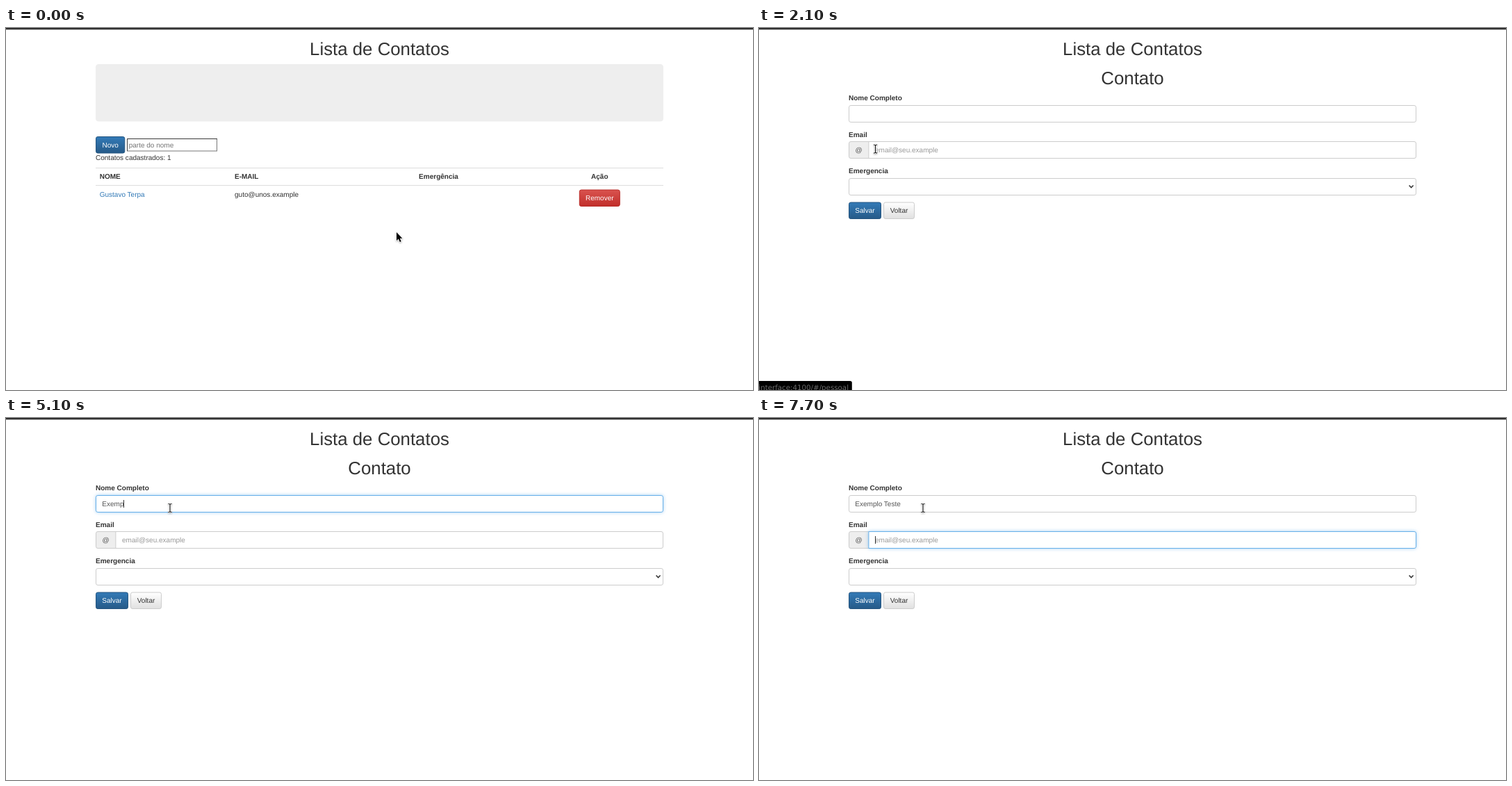
Recreate the animation shown at these times as an HTML page. Size 1075 by 521 pixels, loop 8000 ms.

```html
<!DOCTYPE html>
<html lang="pt-BR">
<head>
<meta charset="utf-8">
<title>Lista de Contatos</title>
<style>
  html, body { margin: 0; width: 100%; height: 100%; overflow: hidden; background: #fff; }
  svg { display: block; width: 100vw; height: 100vh; }
  text {
    font: 10.03px "Liberation Sans", Arial, sans-serif;
    fill: #333; white-space: pre; text-rendering: geometricPrecision;
  }
  .h { font-size: 25.8px; text-anchor: middle; }
  .b { font-weight: bold; }
  .m { text-anchor: middle; }
  .w { fill: #fff; }
  .link { fill: #337ab7; }
  .val { fill: #555; }
  .hint { fill: #999; }
  .url { font: 10.25px "DejaVu Sans", sans-serif; fill: #6b6b6b; text-anchor: end; }
</style>
</head>
<body>
<svg id="stage" viewBox="0 0 1075 521" preserveAspectRatio="none">
  <defs>
    <linearGradient id="blue" x2="0" y2="1"><stop stop-color="#337ab7"/><stop offset="1" stop-color="#265a88"/></linearGradient>
    <linearGradient id="red" x2="0" y2="1"><stop stop-color="#d9534f"/><stop offset="1" stop-color="#c12e2a"/></linearGradient>
    <linearGradient id="pale" x2="0" y2="1"><stop stop-color="#fff"/><stop offset="1" stop-color="#e0e0e0"/></linearGradient>
  </defs>
</svg>
<script>
const LOOP = 8000;
const stage = document.getElementById('stage');
const $ = id => document.getElementById(id);

const text = (x, y, s, cls = '', id = '') =>
  `<text x="${x}" y="${y}" class="${cls}" id="${id}">${s}</text>`;
const rect = (x, y, w, h, fill, stroke = 'none', r = 0, id = '') =>
  `<rect x="${x}" y="${y}" width="${w}" height="${h}" rx="${r}" fill="${fill}" stroke="${stroke}" id="${id}"/>`;
const button = (x, y, w, label, fill, edge, cls = 'w', id = '') =>
  rect(x + .5, y + .5, w - 1, 23.5, fill, edge, 2.6, id) +
  text(x + w / 2, y + 15.7, label, cls + ' m');
const field = (x, y, w, id = '') => rect(x, y, w, 24, '#fff', '#cccccc', 2.6, id);
const shape = (id, d, look) => `<g id="${id}"><path d="${d}" ${look[0]}/><path d="${d}" ${look[1]}/></g>`;

const list =
  rect(129, 52, 817, 82.5, '#eee', 'none', 4.3) +
  button(129, 156, 42.3, 'Novo', 'url(#blue)', '#245580', 'w', 'novo') +
  rect(174.5, 159.5, 129, 17.5, '#fff', '#767676') +
  '<path d="M174.5 177V159.5H304" fill="none" stroke="#3a3a3a"/>' +
  text(176.7, 171.6, 'parte do nome', '', 'filter') +
  text(129, 189.7, 'Contatos cadastrados: 1') +
  rect(129, 201, 817, 1, '#ddd') +
  rect(129, 226, 817, 1, '#ddd') +
  text(134.7, 217.1, 'NOME', 'b') +
  text(329, 217.1, 'E-MAIL', 'b') +
  text(622.5, 217.1, 'Emergência', 'b m') +
  text(854.3, 217.1, 'Ação', 'b m') +
  text(134.7, 242.7, 'Gustavo Terpa', 'link') +
  text(329, 242.7, 'guto@unos.example') +
  button(824.8, 232.5, 59, 'Remover', 'url(#red)', '#b92c28');

const form =
  text(537.5, 81.4, 'Contato', 'h') +
  text(129, 103.9, 'Nome Completo', 'b') +
  field(129.5, 111.5, 816, 'name') +
  text(138.3, 127.1, '', 'val', 'typed') +
  text(129, 156.6, 'Email', 'b') +
  rect(129.5, 163.5, 32, 24, '#eee', '#ccc', 2.6) +
  text(143.6, 178.6, '@', 'val m') +
  '<path id="mail" d="M157.9 163.5H943Q945.5 163.5 945.5 166V185Q945.5 187.5 943 187.5H157.9Z" fill="#fff" stroke="#cccccc"/>' +
  text(167, 178.9, 'email@seu.example', 'hint') +
  text(129, 209, 'Emergencia', 'b') +
  field(129.5, 216.5, 816) +
  '<path d="M935.6 226.4L938.6 229.6L941.6 226.4" fill="none" stroke="#333" stroke-width="1.5"/>' +
  button(129, 250.5, 47, 'Salvar', 'url(#blue)', '#245580') +
  button(179, 250.5, 45, 'Voltar', 'url(#pale)', '#ccc', '') +
  rect(138, 118, 1, 11, '#333', 'none', 0, 'caret');

const solid = ['fill="#fff" stroke="#fff" stroke-width="1.6" stroke-linejoin="round"', 'fill="#000"'];
const line = ['fill="none" stroke="#fff" stroke-width="2.6"', 'fill="none" stroke="#111" stroke-width="1.1"'];
const pointers =
  shape('arrow', 'M0 0V12L2.8 9.5L4.8 14L6.7 13.2L4.8 8.8H8.4Z', solid) +
  shape('hand', 'M-1.3 1Q0 -.6 1.3 1V4.6L5 5.6Q6 6 5.8 7.6L5 12.4H-2.4L-6 8.2Q-6.4 6.8 -5 6.8L-1.3 8Z', solid) +
  shape('beam', 'M-2.6 -6Q0 -6 0 -4.8Q0 -6 2.6 -6M0 -5V5M-2.6 6Q0 6 0 4.8Q0 6 2.6 6', line);

stage.insertAdjacentHTML('beforeend',
  rect(0, 0, 1075, 2.3, '#303030') +
  text(537.5, 39, 'Lista de Contatos', 'h') +
  `<g id="list">${list}</g><g id="form">${form}</g>` +
  `<g id="status">${rect(-4, 508, 137.8, 20, '#000', 'none', 2.6)}${text(129, 520.6, 'interface:4100/#/pessoal', 'url')}</g>` +
  `<g id="pointer" style="filter:drop-shadow(.7px 1px .8px rgba(0,0,0,.3))">${pointers}</g>`);
$('filter').style.fill = '#757575';

// Each row: start time, then the values held until the next row
const moves = [
  [0, 'arrow', 562, 294], [500, 'arrow', 556, 301], [600, 'arrow', 527, 310],
  [700, 'arrow', 468, 308], [800, 'arrow', 388, 298], [900, 'arrow', 300, 284],
  [1000, 'arrow', 224, 268], [1100, 'arrow', 172, 254], [1200, 'arrow', 154, 226],
  [1300, 'arrow', 184, 201], [1700, 'arrow', 174, 185], [1800, 'hand', 162.5, 174.5],
  [2100, 'beam', 167.5, 174], [2200, 'beam', 196, 168], [2300, 'beam', 222, 130],
  [2500, 'beam', 227.5, 123.5], [2800, 'beam', 236, 129.5]
];
const press = [[0, 'url(#blue)', '#245580'], [1800, '#265a88', '#204d74'], [1900, '#1f4c73', '#122b40']];
const status = [[0, 0], [1900, .8], [2100, 1], [2500, .5], [2600, 0]];
const nameGlow = [[0, 0], [2500, .5], [2600, 1], [7500, .3], [7700, 0]];
const mailGlow = [[0, 0], [7500, .6], [7700, 1]];
const caret = [[0, 0], [2600, 1], [3100, 0], [3600, 1]];
const typing = [
  [0, 0], [4200, 1], [4400, 2], [4600, 3], [4800, 4], [5100, 5], [5200, 6],
  [5400, 7], [5700, 8], [6200, 9], [6500, 10], [6600, 11], [6900, 13]
];

const at = (rows, t) => rows.filter(r => r[0] <= t).pop().slice(1);
const show = (id, on) => $(id).setAttribute('visibility', on ? 'inherit' : 'hidden');

function glow(id, k) {
  const mix = (a, b) => Math.round(a + (b - a) * k);
  const el = $(id);
  el.setAttribute('stroke', `rgb(${mix(204, 102)},${mix(204, 175)},${mix(204, 233)})`);
  el.style.filter = k ? `drop-shadow(0 0 2.4px rgba(102,175,233,${.6 * k}))` : 'none';
}

function draw(t) {
  const inForm = t >= 2100;
  $('list').style.display = inForm ? 'none' : '';
  $('form').style.display = inForm ? '' : 'none';

  const [kind, x, y] = at(moves, t);
  ['arrow', 'hand', 'beam'].forEach(k => show(k, k === kind));
  $('pointer').setAttribute('transform', `translate(${x} ${y})`);

  const [fill, edge] = at(press, t);
  $('novo').setAttribute('fill', fill);
  $('novo').setAttribute('stroke', edge);
  $('status').style.opacity = at(status, t)[0];

  glow('name', at(nameGlow, t)[0]);
  glow('mail', at(mailGlow, t)[0]);

  const typed = $('typed');
  typed.textContent = 'Exemplo Teste'.slice(0, at(typing, t)[0]);
  const inMail = t >= 7500;
  const left = inMail || !inForm ? 167 : Math.round(138.3 + typed.getComputedTextLength());
  $('caret').setAttribute('x', left);
  $('caret').setAttribute('y', inMail ? 170 : 118);
  show('caret', at(caret, t)[0]);
}

const start = performance.now();
function tick() {
  draw((performance.now() - start) % LOOP);
  requestAnimationFrame(tick);
}
tick();
</script>
</body>
</html>
```
